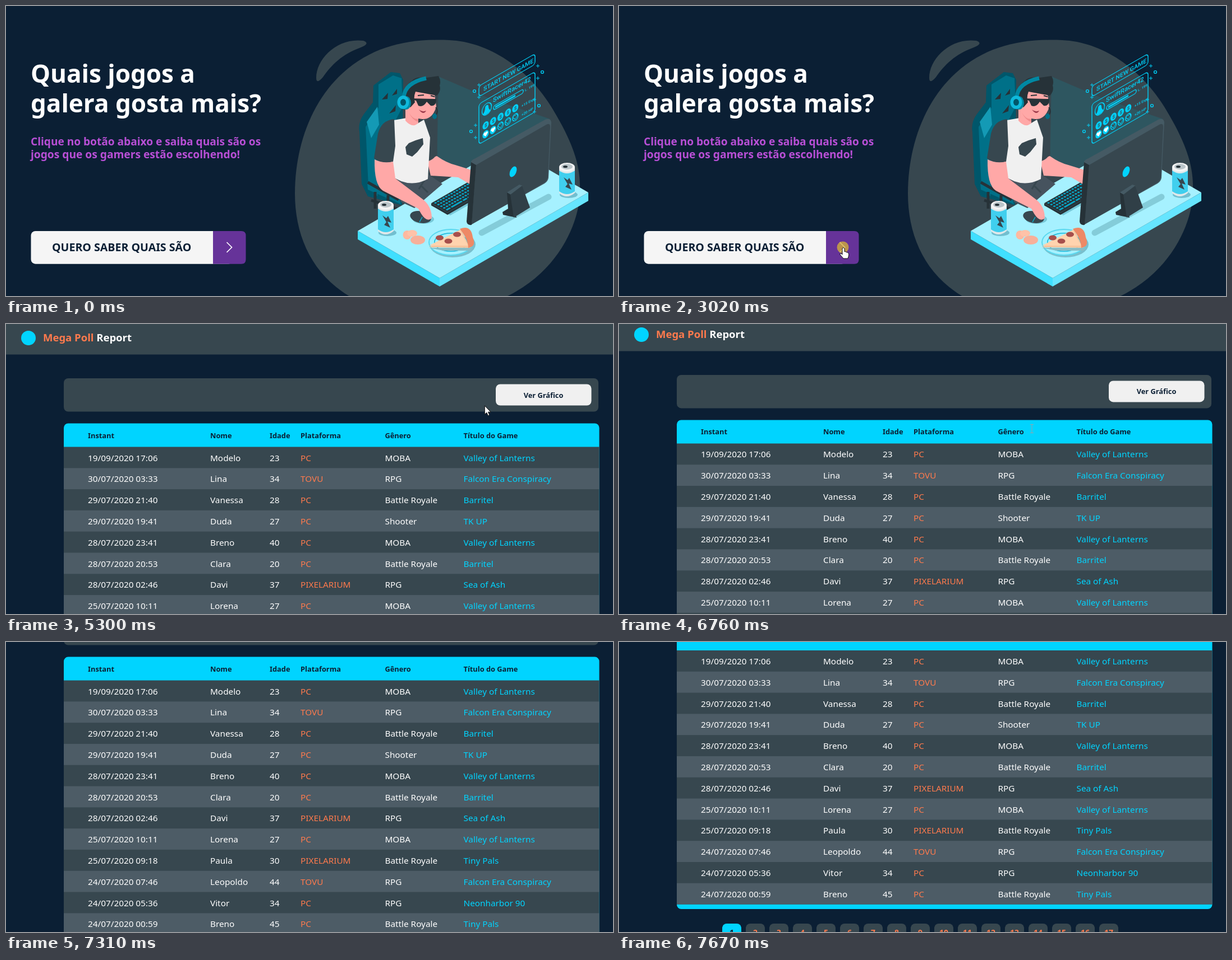
Recreate the animation shown at these times as an HTML page. Size 1082 by 518 pixels, loop 8000 ms.

```html
<!DOCTYPE html>
<html lang="pt">
<head>
<meta charset="utf-8">
<title>Pesquisa de jogos</title>
<style>
html, body { margin: 0; height: 100%; overflow: hidden; background: #0b1f34; }
svg { display: block; width: 100%; height: 100%; font-family: "Noto Sans", "Open Sans", sans-serif; }
.b { font-weight: 700; }
.holo { fill: none; stroke: #00d0f8; stroke-width: 1.4; }
.holo .f { fill: #00d0f8; stroke: none; }
.holo text { font-family: Roboto, sans-serif; font-weight: 500; }
</style>
</head>
<body>
<svg viewBox="0 0 1082 518">
  <g id="landing"></g>
  <g id="page">
    <rect width="1082" height="54.5" fill="#37474f"/>
    <circle cx="40" cy="25" r="13" fill="#00d4ff"/>
    <text class="b" x="66" y="31" font-size="18.5" fill="#fff"><tspan fill="#ff7a4d">Mega Poll</tspan> Report</text>
    <g id="empty"></g>
    <g id="full"></g>
  </g>
  <circle id="click" cx="399" cy="431" r="10.5" fill="#d8b636" opacity=".75"/>
  <g id="cursor">
    <path id="arrow" d="M.5 .5V16L4 12.7 6.5 18.3 9 17.2 6.6 11.8H11.3Z" fill="#fff" stroke="#111"/>
    <path id="hand" d="M0 2Q2-1 4 2V8Q6 6 7 9 9 8 10 10 12 10 11.5 15L10 20H2L-4 13Q-5 10-2 11L0 13Z" fill="#fff" stroke="#111"/>
    <path id="beam" d="M-3-7.5H3M0-7V7M-3 7.5H3" fill="none" stroke="#96a3aa"/>
  </g>
</svg>
<script>
const $ = id => document.getElementById(id);
const path = (fill, d, more = '') => `<path fill="${fill}" d="${d}" ${more}/>`;
const line = (color, width, d, more = '') => path('none', d, `stroke="${color}" stroke-width="${width}" ${more}`);
const oval = (fill, x, y, rx, ry = rx, more = '') => `<ellipse fill="${fill}" cx="${x}" cy="${y}" rx="${rx}" ry="${ry}" ${more}/>`;
const rect = (fill, x, y, w, h, r = 0) => `<rect fill="${fill}" x="${x}" y="${y}" width="${w}" height="${h}" rx="${r}"/>`;
const text = (x, y, size, fill, str, more = '') => `<text x="${x}" y="${y}" font-size="${size}" fill="${fill}" ${more}>${str}</text>`;
const bold = (...args) => text(...args, 'class="b"');
const centered = (...args) => text(...args, 'class="b" text-anchor="middle"');
const at = (transform, content) => `<g transform="${transform}">${content}</g>`;
const times = (n, fn) => Array.from({ length: n }, (_, i) => fn(i)).join('');

const CYAN = '#00d4ff', SLATE = '#37474f', INK = '#263238', STEEL = '#455a64', SKIN = '#ffa8a7';
const NAVY = '#0b1f34', ORANGE = '#ff7a4d', TEAL = '#007088', DEEP = '#00566a';

// Isometric box seen from its front corner (x, y); a and b are the left and right extents.
function isoBox(x, y, a, b, h, top, left, right) {
  const s = Math.tan(Math.PI / 6);
  return path(top, `M${x} ${y}l${-a} ${-a * s} ${b} ${-b * s} ${a} ${a * s}z`) +
    path(left, `M${x} ${y}l${-a} ${-a * s}v${h}l${a} ${a * s}z`) +
    path(right, `M${x} ${y}l${b} ${-b * s}v${h}l${-b} ${b * s}z`);
}

const backdrop = () =>
  path(SLATE, 'M515 335C515 250 545 170 600 120S720 58 790 61 930 110 975 185 1026 300 1022 345 985 475 890 520H615C545 480 515 410 515 335Z') +
  path(SLATE, 'M553 128C553 95 590 56 637 62Q651 67 630 75C600 86 580 105 565 127Q553 141 553 128Z') +
  path('#2e5660', 'M771 126 862 165 970 202 830 290H768Z');

const chair = () =>
  path(DEEP, 'M655 142 686 118 702 120 708 132 706 356 645 340 634 318 630 225Q627 208 638 193L654 172Z') +
  path(TEAL, 'M664 140 690 124 705 129 707 180 664 262 662 340 646 322 641 216 664 181Z') +
  path('#149ab5', 'M643 207 662 180 665 212 651 236Z') +
  path(INK, 'M670 167 681 155 680 166ZM688 160 697 148V157ZM683 192 695 177 694 188Z') +
  path(TEAL, 'M644 316 700 343 704 354 645 328Z') +
  line(INK, 5, 'M645 315 700 346M651 347 708 366M658 332V362M681 338V358');

const gamer = () =>
  path('#46535e', 'M686 305 752 300 778 318 728 361 704 350Z') +
  line(SLATE, 3, 'M736 327 746 311M741 322 752 333') +
  path(SKIN, 'M750 273 768 268Q785 280 801 284L830 293V320L806 306 757 303Z') +
  path(SLATE, 'M741 202Q757 207 763 228L769 264Q762 275 750 278Z') +
  path('#f0f0f0', 'M691 204 714 200Q725 214 735 209L745 203 756 235 752 309Q718 327 685 302Z') +
  path(SLATE, 'M712 252 718 245 730 240 743 236 744 247 733 261 724 269 714 265Z') +
  path(SLATE, 'M692 202Q669 204 663 228L656 272Q670 283 690 278L694 250Z') +
  path(SKIN, 'M657 274Q672 282 690 278L694 308 740 343Q759 356 759 379 750 387 740 371L735 362 672 330Q656 320 657 274Z') +
  path(SKIN, 'M712 165 718 146 764 158 767 180Q760 203 742 202L735 201V209Q725 219 712 205Z') +
  path('#f18d8d', 'M718 190Q725 203 735 202V207Q724 204 718 190Z') +
  path(INK, 'M711 173Q707 144 723 134 730 125 750 128L771 125Q776 134 773 142 776 152 768 160L730 153Q726 163 729 172L721 181Z') +
  line('#0088a3', 7, 'M709 163Q711 137 749 129') +
  oval('#0088a3', 713, 173, 9, 12) + oval('#0fb9dc', 708, 172, 10.5, 12) + oval(DEEP, 708, 172, 5, 6) +
  path(INK, 'M720 165 767 166Q767 180 757 178L750 171Q743 182 735 178L731 169 720 167Z') +
  line(INK, 2, 'M734 160 745 159M757 160 764 162M766 181Q771 187 767 194') +
  path('#9d3b4c', 'M736 185Q742 190 749 187 744 196 736 185Z') + oval(TEAL, 764, 197, 4, 5);

const can = (x, y) => at(`translate(${x} ${y})`,
  oval('#72bfd0', 17, 57, 16, 6) + path('#dfe8ea', 'M0 8V54Q13 66 28 54V8Z') +
  path('#40cfee', 'M0 14Q14 24 28 14V51Q14 61 0 51Z') +
  oval('#f4f4f4', 14, 8, 14, 8) + oval('#bbc5c9', 14, 7, 10, 5) + oval(INK, 11, 7, 4, 2) +
  path(SLATE, 'M8 26 15 31 18 27 24 39 17 37 22 48 11 43 15 38Z'));

const keyboard = () => path('#76c9da', 'M763 358 850 312 870 330 792 374Z') +
  isoBox(787, 369, 29, 72, 4, INK, INK, INK) +
  at('matrix(.87 -.5 .87 .5 758 352)', times(5, i =>
    line('#08a9ca', 3.2, `M3 ${4 + 6 * i}H80`, `stroke-dasharray="${i > 3 ? '8 2 22 2' : '3.5 2'}"`)));

const snacks = () =>
  oval('#ffb9a0', 715, 409, 7.5, 8) + oval('#ffc2a8', 724, 406, 9, 6) + oval('#f7b09a', 734, 418, 13, 8) +
  oval('#79bfcd', 796, 426, 41, 23) + [[40, 24, '#59d8ef'], [38, 22, '#a6f1ff'], [30, 17, '#16b8da'], [28.5, 15.5, '#a6f1ff']]
    .map(([rx, ry, fill]) => oval(fill, 793, 422, rx, ry)).join('') +
  path('#88bdc5', 'M754 432H832L828 437H780Z') + path('#f6c49d', 'M754 431 811 399 827 432Z') +
  path('#ffd3ae', 'M754 428 809 400 824 428Z') +
  path('#ed8965', 'M809 398Q829 390 832 413 839 430 824 432 824 417 809 398Z') +
  times(3, i => oval('#a74f4c', 804 - 15.5 * i, 408 + 12 * (i % 2) + 6 * (i > 1), 7, 4.5));

const desk = () =>
  isoBox(773, 486, 146, 265, 15, '#a6f1ff', '#40dfff', '#66e5ff') + keyboard() +
  oval('#77c9d9', 744, 381, 19, 8) + oval(SLATE, 739, 377, 19, 10.5, 'transform="rotate(12 739 377)"') +
  line('#0ab4d2', 1.5, 'M737 386 742 377') + snacks() + can(663, 348) + can(986, 280);

const monitor = () =>
  line('#84ccd9', 11, 'M848 405 967 341', 'stroke-linecap="round"') +
  path(STEEL, 'M829 278Q830 275 837 272L961 203Q971 199 972 208L967 307Q966 313 960 317L830 390Z') +
  path(SLATE, 'M838 284 963 212Q970 208 970 216L966 304Q965 312 959 316L830 390Z') +
  path(INK, 'M829 279 838 284 830 391Q822 392 821 385Z') +
  oval(CYAN, 904, 296, 5.5, 10, 'transform="rotate(24 904 296)"') +
  path(INK, 'M885 368 895 362 893 333 900 337 910 378 886 373Z') +
  path(STEEL, 'M893 333 915 319 921 321 900 337Z') +
  path('#303f47', 'M899 337 920 321 934 360 905 378Z');

// A ring with two small crosses towards the panel.
const sparkle = (x, y, side) => oval('none', x, y, 2.4) +
  [-11, 11].map(dy => path('none', `M${x + 8 * side - 3} ${y + dy}h6m-3-3v6`, 'stroke-width="1"')).join('');

function hologram() {
  const label = (x, y, size, str) => text(x, y, size, '', str, 'class="f"');
  const badges = times(5, i => {
    const x = 12 + 13.2 * i;
    return oval('', x, 77, 5.5, 6.5, 'class="f"') + text(x - 2, 80, 8, SLATE, '$', 'stroke="none"') +
      oval(i < 2 ? CYAN : 'none', x, 93, 5, 6) +
      path(i < 2 ? '#fff' : 'none', `M${x} 97l-4-5q1-5 4-2 3-3 4 2z`, i < 2 ? 'stroke="none"' : 'stroke-width="1"');
  });
  const panel = rect('none', 0, 0, 100, 19, 5) + label(8, 14, 10.6, 'START NEW GAME') +
    rect('none', 0, 32, 100, 72, 5) + oval('none', 14, 49, 8.5, 10) +
    path('', 'M7 55Q11 51 11 46A3 4 0 0 1 17 46Q17 51 21 55 14 61 7 55Z', 'class="f"') +
    label(25, 44, 11.3, 'SwiftRacer42') + rect('none', 26, 51, 53, 7, 3) + line('#00d0f8', 3, 'M29 54.5h36') +
    label(82, 57, 6, 'L. 199') + label(76, 82, 6.3, '+15 Exp') + label(76, 98, 6.3, '+20 HP') + badges;
  return '<g class="holo">' + at('translate(843 143) skewY(-30)', panel) +
    sparkle(835, 152, 1) + sparkle(829, 224, 1) + sparkle(956, 118, -1) + sparkle(950, 178, -1) + '</g>';
}

$('landing').innerHTML =
  bold(44, 137, 44, '#fff', 'Quais jogos a') + bold(44, 190, 44, '#fff', 'galera gosta mais?') +
  bold(44, 249, 19.1, '#b84fd6', 'Clique no botão abaixo e saiba quais são os') +
  bold(44, 272, 19.2, '#b84fd6', 'jogos que os gamers estão escolhendo!') +
  rect('#f5f5f5', 44.5, 402, 360, 58.7, 8) + path('#663399', 'M369 402h50.5q8 0 8 8v42.7q0 8-8 8H369z') +
  bold(82, 438, 19.6, NAVY, 'QUERO SABER QUAIS SÃO') +
  line('#fff', 1.7, 'M393.5 422 402.5 431 393.5 440') +
  backdrop() + chair() + desk() + gamer() + hologram() + monitor();

const COLUMNS = [146, 364, 470, 525, 675.5, 815.5];
const HEADS = ['Instant', 'Nome', 'Idade', 'Plataforma', 'Gênero', 'Título do Game'];
const ROWS = `19/09/2020 17:06|Modelo|23|PC|MOBA|Valley of Lanterns
30/07/2020 03:33|Lina|34|TOVU|RPG|Falcon Era Conspiracy
29/07/2020 21:40|Vanessa|28|PC|Battle Royale|Barritel
29/07/2020 19:41|Duda|27|PC|Shooter|TK UP
28/07/2020 23:41|Breno|40|PC|MOBA|Valley of Lanterns
28/07/2020 20:53|Clara|20|PC|Battle Royale|Barritel
28/07/2020 02:46|Davi|37|PIXELARIUM|RPG|Sea of Ash
25/07/2020 10:11|Lorena|27|PC|MOBA|Valley of Lanterns
25/07/2020 09:18|Paula|30|PIXELARIUM|Battle Royale|Tiny Pals
24/07/2020 07:46|Leopoldo|44|TOVU|RPG|Falcon Era Conspiracy
24/07/2020 05:36|Vitor|34|PC|RPG|Neonharbor 90
24/07/2020 00:59|Breno|45|PC|Battle Royale|Tiny Pals`.split('\n').map(row => row.split('|'));
const ROW_H = 37.8, BODY_TOP = 219.5, BODY_H = ROW_H * ROWS.length;

const tableFrame = (columns, extra, bodyH) =>
  rect(SLATE, 103, 97, 953 + extra, 59.5, 8) + rect('#f0f0f0', 873 + extra, 107.5, 170.5, 38, 8) +
  centered(958 + extra, 131.5, 12.8, NAVY, 'Ver Gráfico') +
  rect(CYAN, 103, 177.5, 954.5 + extra, 50.5 + bodyH, 8) +
  HEADS.map((head, i) => bold(columns[i], 203.5, 12.8, NAVY, head)).join('');

const tableRow = (row, r) => {
  const y = BODY_TOP + r * ROW_H;
  return (r % 2 ? rect('#4d5c66', 103, y, 954.5, ROW_H) : '') +
    row.map((cell, i) => text(COLUMNS[i], y + 25, 15.3, i === 3 ? ORANGE : i === 5 ? CYAN : '#fff', cell)).join('');
};

$('empty').innerHTML = tableFrame(COLUMNS.map(x => 146 + (x - 146) * .93), 13, 0);
$('full').innerHTML = tableFrame(COLUMNS, 0, BODY_H) +
  rect(SLATE, 103, BODY_TOP, 954.5, BODY_H) + ROWS.map(tableRow).join('') +
  times(17, i => rect(i ? SLATE : CYAN, 184 + 42 * i, 707.5, 34, 34, 8) +
    centered(201 + 42 * i, 728.5, 14, i ? ORANGE : NAVY, i + 1));

const STEP = 68.5, SCROLL_START = 6760, SCROLL_END = 204.5;
// start time, number of steps, end x, end y
const MOVES = [[590, 1, 825, 418], [658, 1, 671, 364], [1060, 4, 443, 418], [1480, 8, 398, 431],
  [3610, 1, 401, 431], [4550, 3, 685, 224], [4890, 3, 1028, 83], [5100, 5, 736, 187]];

function cursorAt(t) {
  let x = 0, y = 0;
  for (const [start, steps, toX, toY] of MOVES) {
    if (t < start) break;
    const k = Math.min(1, (Math.floor((t - start) / STEP) + 1) / steps);
    x += (toX - x) * k;
    y += (toY - y) * k;
  }
  return [x, y];
}

function scrollAt(t) {
  if (t < SCROLL_START) return 0;
  const elapsed = Math.floor((t - SCROLL_START) / STEP) * STEP + 110;
  return SCROLL_END * (1 - Math.cos(Math.PI * Math.min(1, elapsed / 1000))) / 2;
}

const show = (id, on) => $(id).setAttribute('display', on ? 'inline' : 'none');

function draw(now) {
  const t = now % 8000, onPage = t >= 3090, loaded = t >= 3610;
  const [x, y] = cursorAt(t);
  const kind = !onPage ? (x < 428 ? 'hand' : 'arrow') : !loaded || y < 160 ? 'arrow' : 'beam';
  show('landing', !onPage);
  show('page', onPage);
  show('empty', !loaded);
  show('full', loaded);
  show('click', t >= 3020 && !onPage);
  show('cursor', t >= 590 && t < SCROLL_START + STEP);
  for (const id of ['arrow', 'hand', 'beam']) show(id, id === kind);
  $('page').setAttribute('transform', `translate(0 ${-scrollAt(t)})`);
  $('cursor').setAttribute('transform', `translate(${x} ${y})`);
  requestAnimationFrame(draw);
}
requestAnimationFrame(draw);
</script>
</body>
</html>
```
